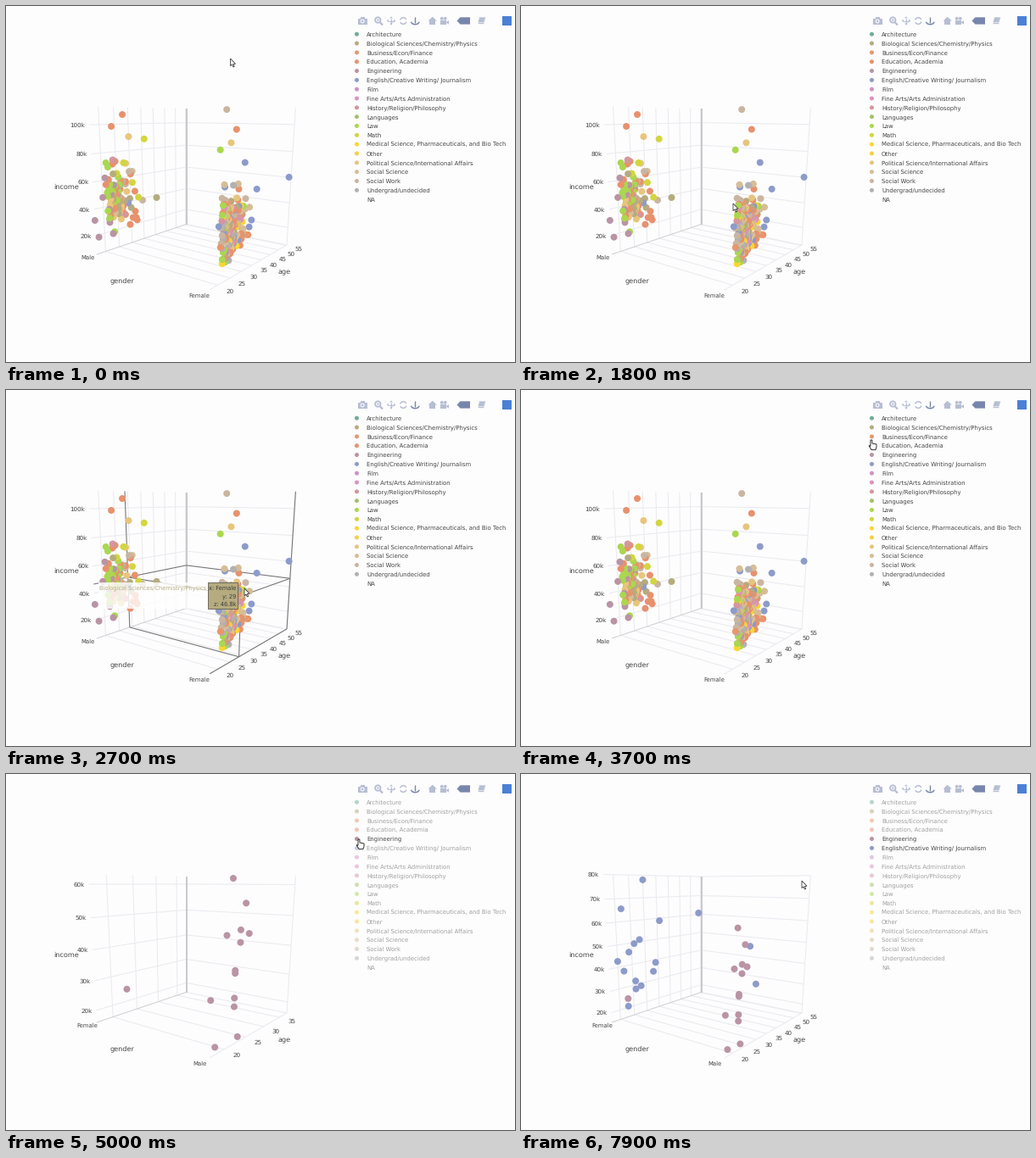
A matplotlib script that plays this animation: 600x420 px, repeating every 8 s.

```python
import numpy as np
import matplotlib.pyplot as plt
from matplotlib.animation import FuncAnimation
from matplotlib.patches import Circle, Polygon, Rectangle

W, H, DPI = 600, 420, 100
STEP, FRAMES = 100, 80
PT = 72 / DPI
INK, BG, GRID, SPIKE = "#444444", "#fdfdfe", "#eaeaef", "#777777"

plt.rcParams["font.family"] = "DejaVu Sans"
plt.rcParams["text.hinting"] = "none"
plt.rcParams["toolbar"] = "None"
fig = plt.figure(figsize=(W / DPI, H / DPI), dpi=DPI, facecolor=BG)
ax = fig.add_axes([0, 0, 1, 1])
ax.set_xlim(0, W)
ax.set_ylim(H, 0)
ax.axis("off")

FIELDS = [
    ("Architecture", "#70ae97"),
    ("Biological Sciences/Chemistry/Physics", "#b5ab7f"),
    ("Business/Econ/Finance", "#e7976c"),
    ("Education, Academia", "#e8916d"),
    ("Engineering", "#ba94a4"),
    ("English/Creative Writing/ Journalism", "#8d9bca"),
    ("Film", "#cc95c6"),
    ("Fine Arts/Arts Administration", "#dc92be"),
    ("History/Religion/Philosophy", "#d5969f"),
    ("Languages", "#a3c069"),
    ("Law", "#aad74f"),
    ("Math", "#d2d63e"),
    ("Medical Science, Pharmaceuticals, and Bio Tech", "#fad733"),
    ("Other", "#f8d140"),
    ("Political Science/International Affairs", "#e8c57c"),
    ("Social Science", "#d6bd97"),
    ("Social Work", "#c9b5a0"),
    ("Undergrad/undecided", "#b3b0b2"),
    ("NA", None),
]
BIO, EDU, ENG, ENGLISH, LAW, MATH, POL, WORK = 1, 3, 4, 5, 10, 11, 14, 16
MALE, FEMALE = 0, 1


# drawing helpers, all in stage pixels
def text(x, y, s, size=6.9, color=INK, ha="left", z=5):
    return ax.text(x, y + 0.36 * size, s, size=size * PT, color=color,
                   ha=ha, va="baseline", zorder=z)


def line(pts, color=GRID, lw=1.0, z=1):
    xs, ys = zip(*pts)
    return ax.plot(xs, ys, color=color, lw=lw * PT, zorder=z,
                   solid_capstyle="butt")[0]


def shape(patch, color, z=5, edge="none", lw=0):
    patch.set(facecolor=color, edgecolor=edge, linewidth=lw * PT, zorder=z)
    return ax.add_patch(patch)


def rect(x, y, w, h, color, z=5, **kw):
    return shape(Rectangle((x, y), w, h), color, z, **kw)


def disc(x, y, r, color, z=5, **kw):
    return shape(Circle((x, y), r), color, z, **kw)


def arc(x, y, rx, ry, start, end, color):
    t = np.linspace(start, end, 14)
    line(list(zip(x + rx * np.cos(t), y + ry * np.sin(t))), color, 1.5, 5)


def depth(g, d, z):
    return 1 - 0.158 * g - 0.217 * d - 0.068 * z


def project(g, d, z):
    """g: back to front wall, d: oldest to youngest, z: height, all 0..1."""
    w = depth(g, d, z)
    return ((212.5 + 66.2 * g - 128.7 * d - 14.45 * z) / w,
            (257.5 - 20.1 * g - 28.1 * d - 144.7 * z) / w)


# survey answers: (gender, age, income in thousands, field)
def survey():
    rows = [(MALE, a, v, ENG) for a, v in [
        (21, 61.6), (24, 55.2), (23, 48.2), (25, 46.8), (20, 47.4), (23, 44.8),
        (22, 37.4), (22, 36.6), (22, 29.6), (17, 31.6), (22, 27.1), (23, 17.5),
        (18, 18.1)]]
    rows += [(FEMALE, a, v, ENGLISH) for a, v in [
        (30, 78), (22, 65.6), (54, 60.8), (36, 58.8), (28, 51), (26, 49.5),
        (24, 46), (20, 42.7), (34, 38.6), (22, 37.7), (33, 34.4), (26, 31.8),
        (28, 28.8), (26, 27.9), (23, 20.6)]]
    rows += [(FEMALE, 23, 24.3, ENG), (MALE, 26, 54.2, ENGLISH),
             (MALE, 29, 38.9, ENGLISH)]
    # the best paid stand apart from the crowd
    rows += [(FEMALE, 22, 109.7, WORK), (MALE, 28, 106.9, EDU),
             (MALE, 24, 98.5, EDU), (FEMALE, 26, 98.5, EDU),
             (MALE, 30, 90.5, POL), (FEMALE, 24, 91, POL),
             (MALE, 36, 88, MATH), (FEMALE, 20, 87.6, LAW)]
    rng = np.random.default_rng(5)
    men = [1, 2, 3, 3, 3, 3, 8, 10, 10, 10, 11, 14, 15, 16]
    women = [1, 2, 3, 3, 3, 7, 8, 8, 10, 10, 12, 13, 14, 14, 15, 15, 15, 16, 16, 17]
    for gender, count, fields, pay, years in [(MALE, 90, men, 46, 6.2),
                                              (FEMALE, 150, women, 40, 4.2)]:
        for _ in range(count):
            field = rng.choice(fields)
            spread = years * (0.6 if field == LAW else 1)
            age = 20.3 + rng.gamma(3, spread / 3)
            income = max(18, rng.gamma(13, pay / 13))
            rows.append((gender, age, income, field))
    return rows


ROWS = survey()


class Scene:
    """The box, its points and the legend for one choice of fields."""

    def __init__(self, back, fields, incomes, floor, per_k, ages, youngest, per_year):
        self.back, self.fields = back, fields
        self.incomes, self.ages = incomes, ages
        self.z = lambda v: floor + per_k * (v - 20)
        self.d = lambda a: youngest - per_year * (a - 20)

    def place(self, gender, age, income):
        return int(gender != self.back), self.d(age), self.z(income)

    def box(self):
        out = []
        for v in self.incomes:
            z = self.z(v)
            edge = project(0, 1, z)
            out.append(line([edge, project(0, 0, z), project(1, 0, z)]))
            out.append(text(edge[0] - 4.8, edge[1], f"{v}k", 7.2, ha="right"))
        for a in self.ages:
            d = self.d(a)
            out.append(line([project(0, d, 1), project(0, d, 0), project(1, d, 0)]))
            x, y = project(1, d, 0)
            out.append(text(x + 14.5, y + 4.4 + 2.4 * d, str(a), 7.2, ha="center"))
        for g, d, z in [(1, 0, 1), (0, 0, 0), (1, 1, 0)]:
            out.append(line([project(g, d, z), project(1, 0, 0)]))
        out.append(line([project(0, 1, 0), project(0, 0, 0)], "#cfcfd3"))
        out.append(line([project(0, 0, 1), project(0, 0, 0)], "#c2c2c5", 1.7))
        names = ["Male", "Female"]
        out.append(text(96, 296, names[self.back], ha="center"))
        out.append(text(228, 341, names[1 - self.back], ha="center"))
        return out

    def points(self):
        spots = [(self.place(*row[:3]), row[3]) for row in ROWS
                 if row[3] in self.fields]
        spots.sort(key=lambda s: -depth(*s[0]))
        xs, ys = zip(*(project(*p) for p, _ in spots))
        return [ax.scatter(xs, ys, s=(8 * PT) ** 2, linewidths=0, zorder=3,
                           c=[FIELDS[k][1] for _, k in spots])]

    def legend(self):
        out = []
        for i, (name, color) in enumerate(FIELDS):
            y = 33.2 + 10.83 * i
            row = [text(425, y, name)]
            if color:
                row.append(disc(413.5, y, 2.5, color))
            for part in row:
                part.set_alpha(1 if i in self.fields else 0.5)
            out += row
        return out

    def draw(self):
        return self.box() + self.points() + self.legend()

    def hover(self, gender, age, income, field):
        g, d, z = spot = self.place(gender, age, income)
        x, y = project(*spot)
        ends = [((0, d, 1), (0, d, 0)), ((0, d, 0), (1, d, 0)),
                ((0, 1, z), (0, 0, z)), ((0, 0, z), (1, 0, z)),
                ((g, 0, 1), (g, 0, 0)), ((g, 1, 0), (g, 0, 0)),
                (spot, (0, d, z)), (spot, (g, 0, z)), (spot, (g, d, 0))]
        out = [line([project(*p), project(*q)], SPIKE, 1.1, 2) for p, q in ends]
        name, color = FIELDS[field]
        side, ha = (-1, "right") if g else (1, "left")
        near = x + side * 4.5
        rows = [f"x: {['Male', 'Female'][gender]}", f"y: {age}", f"z: {income:g}k"]
        labels = [text(near + side * 1.5, y + 9.6 * (i - 1), s, 6.7, "#3c3c38", ha, 8)
                  for i, s in enumerate(rows)]
        render = fig.canvas.get_renderer()

        def width(t):
            return t.get_window_extent(render).width

        far = near + side * (max(map(width, labels)) + 2.2)
        tag = text(far + side * 2, y - 9.6, name, 6.6, color, ha, 8)
        end = far + side * (width(tag) + 3)
        top = y - 15.7
        out.append(rect(min(far, end), top, abs(end - far), 31, (1, 1, 1, 0.8), 6))
        out.append(rect(min(near, far), top, abs(far - near), 31, color, 7,
                        edge="#66645a", lw=0.9))
        return out + labels + [tag]


def toolbar():
    pale, dark = "#b6bed2", "#7886ab"
    # photo camera
    rect(415, 14.5, 10.5, 7, pale)
    rect(418, 13, 4.5, 2, pale)
    disc(420.2, 18, 1.9, pale, edge=BG, lw=1.1)
    # zoom
    disc(438.3, 16.5, 3.2, BG, edge=pale, lw=1.8)
    disc(438.3, 16.5, 1.2, pale)
    line([(440.5, 19), (444, 22.5)], pale, 2.2, 5)
    # pan
    for dx, dy in [(1, 0), (-1, 0), (0, 1), (0, -1)]:
        tip = np.array([454 + 5.2 * dx, 17.5 + 5.2 * dy])
        back, wide = np.array([dx, dy]) * 2.2, np.array([dy, dx]) * 1.9
        line([(454, 17.5), tip - back], pale, 1.2, 5)
        shape(Polygon([tip, tip - back + wide, tip - back - wide]), pale)
    # orbit and turntable
    for start in (0.3, 0.3 + np.pi):
        arc(468.3, 17.5, 3.8, 3.8, start, start + 2.4, pale)
    line([(482.3, 12.6), (482.3, 20)], dark, 1.4, 5)
    arc(482.3, 18.7, 4.6, 3, 0, np.pi, dark)
    # home and film camera
    shape(Polygon([(497.5, 17.5), (502.7, 12.8), (508, 17.5)]), pale)
    rect(499.2, 17, 7, 4.6, pale)
    rect(512, 16.8, 7, 5, pale)
    shape(Polygon([(518.5, 19.3), (522, 17), (522, 21.8)]), pale)
    for x in (513.8, 517.8):
        disc(x, 14.8, 1.9, pale)
    # tags
    shape(Polygon([(531.5, 17.5), (535.5, 13.3), (547, 13.3), (547, 21.6),
                   (535.5, 21.6)]), dark)
    for lift in (0, 1.7):
        shape(Polygon([(558, 14.7 - lift), (565.5, 14.7 - lift),
                       (563.5, 21.4 - lift), (556, 21.4 - lift)]), pale,
              edge=BG, lw=0.6)
    rect(584.5, 12, 11, 11, "#4a80d6")


ARROW = np.array([(0, 0), (0, 8.6), (2, 6.9), (3.4, 10), (4.7, 9.4),
                  (3.4, 6.4), (6, 6.2)])
HAND = np.array([(0, 0), (1.9, 0), (2, 4), (7, 5), (7, 8.8), (5.8, 11.6),
                 (1.2, 11.6), (-2, 6.6), (0, 7.3)])

# rests of the pointer: arrive, leave, x, y
STOPS = [(0, 100, 264.5, 62), (800, 900, 151, 193), (1000, 1300, 140, 196),
         (1800, 1800, 250, 233), (2700, 2900, 281, 234), (3600, 4100, 412, 59),
         (4500, 5500, 415, 77), (6200, 7100, 414, 87), (7500, 7500, 492, 181),
         (7900, 8000, 331, 126)]


def pointer(t):
    for (_, t0, *a), (t1, _, *b) in zip(STOPS, STOPS[1:]):
        if t <= t1:
            u = np.clip((t - t0) / (t1 - t0), 0, 1)
            return np.array(a) + (np.array(b) - a) * u * u * (3 - 2 * u)
    return np.array(STOPS[-1][2:])


toolbar()
text(56, 212.5, "income", 8.2)
text(136.5, 323, "gender", 8.2, ha="center")
text(328.5, 313.5, "age", 8.2, ha="center")

wide = range(20, 60, 5), 0.921, 0.026
everyone = Scene(MALE, range(len(FIELDS)), range(20, 101, 20), 0.137, 0.00936, *wide)
engineers = Scene(FEMALE, [ENG], range(20, 61, 10), 0.087, 0.0213,
                  range(20, 40, 5), 0.853, 0.0485)
writers_too = Scene(FEMALE, [ENG, ENGLISH], range(20, 81, 10), 0.07, 0.0155, *wide)

# each group is visible from its start up to its end
TIMED = [
    (0, 4800, everyone.draw()),
    (4800, 6600, engineers.draw()),
    (6600, 8000, writers_too.draw()),
    (800, 1000, everyone.hover(MALE, 31, 60, EDU)),
    (1000, 1400, everyone.hover(MALE, 26, 64.716, BIO)),
    (2400, 3000, everyone.hover(FEMALE, 29, 46.8, BIO)),
]
arrow = shape(Polygon(ARROW), "white", 10, "#333333", 0.8)
hand = shape(Polygon(HAND), "white", 10, "#222222", 0.9)


def update(i):
    t = i * STEP
    for start, end, group in TIMED:
        for part in group:
            part.set_visible(start <= t < end)
    pos = pointer(t)
    on_legend = 406 < pos[0] < 550 and 28 < pos[1] < 95
    arrow.set_xy(ARROW + pos)
    hand.set_xy(HAND + pos)
    arrow.set_visible(not on_legend)
    hand.set_visible(on_legend)
    return []


anim = FuncAnimation(fig, update, frames=FRAMES, interval=STEP,
                     repeat=True, repeat_delay=0, blit=False)
plt.show()
```
